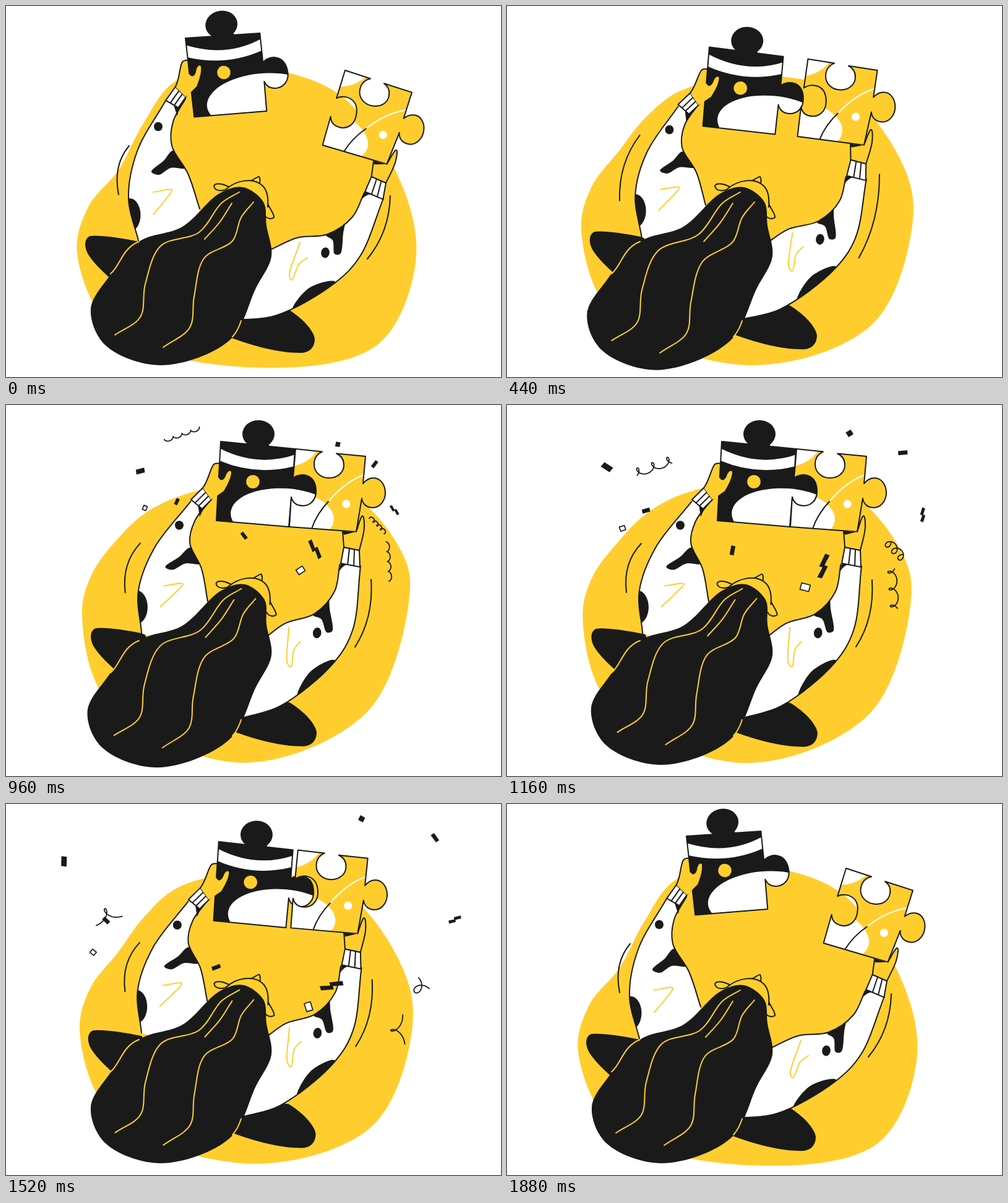
Animation of 800x600 px, one loop 1920 ms. Source, as an HTML page with a canvas:

```html
<!DOCTYPE html>
<html lang="en">
<head>
<meta charset="utf-8">
<title>Puzzle</title>
<style>
html, body { margin: 0; width: 100%; height: 100%; overflow: hidden; background: #fff; }
canvas { display: block; width: 800px; height: 600px; }
</style>
</head>
<body>
<canvas id="stage" width="800" height="600"></canvas>
<script>
const ctx = document.getElementById('stage').getContext('2d');
const YELLOW = '#ffce2e', BLACK = '#1a1a1a', WHITE = '#fff';
const LOOP = 1920, STEP = 40;
const { PI, sin, cos, sqrt, hypot, min, max } = Math;
const clamp = v => max(0, min(1, v));
const mix = (a, b, p) => a.map((v, i) => v + (b[i] - v) * p);
const add = (a, b, k = 1) => a.map((v, i) => v + b[i] * k);
const ease = (t, from, to) => {
  const u = clamp((t - from) / (to - from));
  return u * u * (3 - 2 * u);
};

// Applies f(x, y) to every point of a flat x,y list.
function warp(pts, f) {
  const out = [];
  for (let i = 0; i < pts.length; i += 2) out.push(...f(pts[i], pts[i + 1]));
  return out;
}

// Bezier handle at b towards c for a centripetal spline coming from a.
function handle(a, b, c) {
  const d1 = sqrt(hypot(b[0] - a[0], b[1] - a[1])), d2 = sqrt(hypot(c[0] - b[0], c[1] - b[1]));
  if (!d1 || !d2) return mix(b, c, 1 / 3);
  return b.map((v, i) => v + d2 / 3 * ((v - a[i]) / d1 * d2 + (c[i] - v) / d2 * d1) / (d1 + d2));
}

function curve(pts, closed, path = new Path2D(), join = false) {
  const n = pts.length / 2;
  const at = i => {
    i = closed ? (i + n) % n : max(0, min(n - 1, i));
    return [pts[2 * i], pts[2 * i + 1]];
  };
  path[join ? 'lineTo' : 'moveTo'](...at(0));
  for (let i = 0; i < (closed ? n : n - 1); i++) {
    const b = at(i), c = at(i + 1);
    path.bezierCurveTo(...handle(at(i - 1), b, c), ...handle(at(i + 2), c, b), ...c);
  }
  if (closed) path.closePath();
  return path;
}

const shape = p => typeof p === 'string' ? new Path2D(p) : p;
function fill(p, color = BLACK) { ctx.fillStyle = color; ctx.fill(shape(p)); }
function line(p, color = BLACK, width = 2) {
  ctx.strokeStyle = color;
  ctx.lineWidth = width;
  ctx.stroke(shape(p));
}
function oval(x, y, rx, ry, color = BLACK, turn = 0) {
  ctx.beginPath();
  ctx.ellipse(x, y, rx, ry, turn, 0, 2 * PI);
  ctx.fillStyle = color;
  ctx.fill();
}
function within(move, draw) {
  ctx.save();
  move();
  draw();
  ctx.restore();
}
const shifted = (x, y, draw) => within(() => ctx.translate(x, y), draw);
const clipped = (path, draw) => within(() => ctx.clip(path), draw);

// Grips are [corner x, corner y, turn in degrees]; bend shears the arm from open to joined.
const LEFT = {
  open: [290, 52, -9.5], joined: [347, 59, 0], dip: [0, 11, 5.3],
  recoil: [-4, -4, -.9], rest: 400, start: 260, wrist: [316, 152],
  bend: (x, y) => [41 - .16 * (y - 153), -.06 * (y - 153)],
  follow: (x, y) => clamp((360 - y) / 210) ** 1.5
};
const RIGHT = {
  open: [548, 104, 12.2], joined: [468, 71, 0], dip: [-3, 8, 0],
  recoil: [7, 3, .8], rest: 240, start: 200, wrist: [557, 260],
  bend: (x, y) => [min(8, -37 + .27 * (y - 311)), -.2 * (x - 365)],
  follow: (x, y) => clamp((450 - y) / 150) ** 2
};

const joining = (side, t) => ease(t, side.start, 560) - ease(t, 1460, 1880);

function grip(side, t) {
  const p = joining(side, t), kick = t < side.rest ? sin(PI * t / side.rest) : 0;
  return add(add(mix(side.open, side.joined, p), side.dip, 4 * p * (1 - p)), side.recoil, kick);
}

function place(side, [x, y, deg], [px, py]) {
  const a = deg * PI / 180, dx = px - side.joined[0], dy = py - side.joined[1];
  return [x + dx * cos(a) - dy * sin(a), y + dx * sin(a) + dy * cos(a)];
}

// Bends the open arm, and lets points near the wrist follow the hand.
function poser(side, t) {
  const p = joining(side, t);
  const bent = (x, y) => add([x, y], side.bend(x, y), p);
  const off = add(place(side, grip(side, t), side.wrist),
    bent(...place(side, side.open, side.wrist)), -1);
  return pts => warp(pts, (x, y) => add(bent(x, y), off, side.follow(x, y)));
}

function held(side, t, draw) {
  const [x, y, deg] = grip(side, t);
  within(() => {
    ctx.translate(x, y);
    ctx.rotate(deg * PI / 180);
    ctx.translate(-side.joined[0], -side.joined[1]);
  }, draw);
}

function arm(outer, inner, hidden, marks) {
  const body = curve(outer);
  body.lineTo(...hidden);
  curve(inner, false, body, true);
  body.closePath();
  fill(body, WHITE);
  clipped(body, marks);
  line(curve(outer));
  line(curve(inner));
}

function leftArm(t) {
  const at = poser(LEFT, t);
  arm(at([258,153, 212,235, 198,310, 215,383]),
    at([313,328, 294,271, 268,226, 270,187, 290,150]), [300, 400], () => {
      fill(curve(at([235,268, 255,250, 270,234, 290,262, 266,262, 247,273]), true));
      oval(...at([200, 338]), 17.5, 27);
      oval(...at([246, 195]), 7, 7.3);
      line(curve(at([238,301, 268,297.5, 258,313, 238,337])), YELLOW);
    });
}

function rightArm(t) {
  const at = poser(RIGHT, t);
  arm(at([610,311, 572,405, 530,449, 435,501, 372,508]),
    at([428,394, 470,375, 520,369, 560,341, 579,302]), [340, 470], () => {
      fill(curve(at([548,343, 517,370, 528,379, 531,401, 540,401, 545,368]), true));
      fill(curve(at([463,492, 490,456, 532,446, 515,480]), true));
      oval(...at([516, 399]), 6.8, 8.6, BLACK, .15);
      line(curve(at([475,382, 458,436, 462,443, 474,417, 487,407])), YELLOW);
    });
}

function cuff(a, b, c, d) {
  const p = new Path2D();
  [a, b, c, d].forEach(v => p.lineTo(...v));
  p.closePath();
  fill(p, WHITE);
  for (const u of [.36, .68]) {
    p.moveTo(...mix(a, b, u));
    p.lineTo(...mix(d, c, u));
  }
  line(p);
}

const leftPiece = new Path2D('M347 59 L467 71 L464 118 C475 109 500 110 501 138 ' +
  'C502 155 490 163 480 163 C468 163 463 157 461 149 L457 197 L340 187 Z');
const rightPiece = new Path2D('M468 71 L511 75.5 C501 80 498 88 498 96 C498 110 510 118 522 118 ' +
  'C536 118 546 109 546 97 C546 88 542 82 534 78.5 L581 83 L577 127 C582 121 588 118 594 118 ' +
  'C605 118 613 129 613 142 C613 155 604 166 593 166 C583 166 576 160 575 151 L566 205 L458 197 ' +
  'L461 149 C463 157 468 163 480 163 C490 163 502 155 501 138 C500 110 475 109 464 118 Z');

function leftHeld() {
  fill('M310 160 L331 153 Q319 166 313 181 Z');
  cuff([318,134], [332,153], [317,168], [299,153]);
  const finger = 'M318 134 C327 122 329 106 335 97 Q338 93 347 95 L350 130 L332 153';
  fill(finger, YELLOW);
  line(finger);
  fill(leftPiece);
  clipped(leftPiece, () => {
    fill('M347 71 Q408 101 468 80 L466 99 Q405 115 345 90 Z', WHITE);
    oval(452, 180, 89, 45, WHITE, .07);
  });
  oval(399, 124, 10.8, 10.8, YELLOW);
  line(leftPiece);
  oval(408, 47, 26, 22.5);
  fill('M395 60 L424 60 L426 69 L392 66 Z');
  fill('M319 135 C328 124 338 113 344 118 C347 124 352 122 355 115 ' +
    'C357 108 362 104 364 108 C364 119 356 132 352 139 L332 153 Z', YELLOW);
}

function rightHeld() {
  fill('M541 256 L558 257 Q545 257 538 270 Z');
  fill(rightPiece, YELLOW);
  clipped(rightPiece, () => {
    fill('M464 68 L506 70 Q490 94 464 99 Z', WHITE);
    oval(446, 180, 84, 44, WHITE, .07);
    line('M494 200 Q502 176 522 155');
    line('M522 155 Q547 125 578 113', WHITE);
  });
  oval(550, 160, 6.6, 6.6, WHITE);
  line(rightPiece);
  cuff([546,230], [571,235], [572,262], [541,256]);
  const hand = 'M544 204 L546 230 L571 235 C574 222 579 208 579 196 C579 184 578 178 575 180 C571 187 570 194 566 205';
  fill(hand, YELLOW);
  fill('M544 204 L566 205 L546 210 Z');
  line(hand);
}

function blob(q) {
  fill(curve(mix(
    [115,400, 133,325, 182,265, 222,190, 275,121, 400,100,
     540,144, 640,290, 662,415, 600,548, 415,585, 180,530],
    [123,340, 138,275, 180,217, 225,175, 285,146, 420,120,
     560,146, 643,245, 652,310, 585,495, 380,578.5, 165,480], q), true), YELLOW);
}

function legs(q) {
  shifted(9 * q, -11 * q, () =>
    fill('M215 381 C180 374 150 370 136 372 C126 376 126 390 133 402 Q143 418 168 440 L240 440 Z'));
  shifted(3 * q, -9 * q, () =>
    fill('M455 490 C480 505 497 525 499 538 C499 553 490 561 475 561 C440 561 400 550 362 536 L380 480 Z'));
}

// Speed lines follow the arms and stretch while the pieces meet.
function dash(open, joined, stretch, bow, p, burst) {
  const [x, y, X, Y] = add(mix(open, joined, p), stretch, burst);
  line(`M${x} ${y} Q${(x + X) / 2 + bow[0]} ${(y + Y) / 2 + bow[1]} ${X} ${Y}`);
}

function dashes(t) {
  const burst = sin(PI * clamp((t - 200) / 800)) ** 2;
  dash([199,226,182,305], [217,224,193,303], [6,-24,-11,17], [-18,-8], joining(LEFT, t), burst);
  dash([621,307,584,409], [590,283,564,391], [6,-26,-1,18], [17,8], joining(RIGHT, t), burst);
}

function head(k) {
  shifted(3.5 * k, -2.5 * k, () => {
    for (const p of [
      'M361 293 C348 286 338 286 336 291 C337 299 350 302 361 293',
      'M392 284 C402 281 405 276 409 276 Q412 280 409 291',
      'M422 318 C428 331 434 337 433 342 C428 346 420 343 418 338',
      'M356 296 C372 282 400 276 415 291 Q425 301 423 325']) {
      fill(p, YELLOW);
      line(p);
    }
  });
}

function hair(h, k) {
  // Points swing more the further they lie from the crown.
  const sway = (pts, from, range, dx, dy) => warp(pts, (x, y) => {
    const reach = (400 - x) * .6 + (y - 300) * .75, w = h * clamp((reach - from) / range);
    return [x + dx * w, y + dy * w];
  });
  const lift = pts => warp(pts, (x, y) => add([x, y], [3, -3], k * clamp((330 - y) / 20)));
  fill(curve(lift(sway([215,381, 285,357, 345,303, 383,293, 416,317, 421,355, 429,405, 404,456,
    362,540, 250,581, 160,548, 137,490, 167,437], 170, 130, -10, 10)), true));
  line('M215 381 C187 392 185 420 169 433', YELLOW);
  line('M380 509 Q375 525 366 535', YELLOW);
  shifted(3.5 * k, -4 * k, () => {
    for (const lock of [
      [377,301, 348,319, 312,366, 250,388, 225,450, 217,503, 176,532],
      [400,317, 380,342, 366,380, 320,408, 304,470, 297,520, 254,552],
      [365,319, 345,350, 321,377]])
      line(curve(sway(lock, 60, 110, -9, 12)), YELLOW);
  });
}

const shapes = {
  bar: 'M-.42 -.5 L.5 -.46 L.44 .5 L-.5 .46 Z',
  card: 'M-.5 -.5 L.5 -.5 L.5 .5 L-.5 .5 Z',
  bolt: 'M-.5 -.4 L-.25 -.5 L0 -.06 L.18 -.14 L.5 .38 L.26 .5 L.02 .06 L-.16 .14 Z'
};
// Kind, place, drift, size, turn.
const bits = [
  ['bar', 218,107, -96,-11, 15,8, -.3],
  ['bar', 277,156, -89,25, 6,11, .4],
  ['card', 225,166, -65,57, 6,7, .4],
  ['bar', 385,211, -35,41, 6,13, -.7],
  ['bolt', 499,233, 21,47, 22,32, 0],
  ['card', 476,267, 10,47, 12,9, -.6],
  ['bar', 536,64, 30,-31, 8,8, .1],
  ['bar', 595,96, 76,-32, 6,13, .6],
  ['bolt', 627,170, 76,13, 16,16, 0]
];
// Place, drift, heading, length.
const ribbons = [
  [285,48, -91,98, 2.8, 60],
  [601,194, 50,77, .8, 34],
  [619,253, 10,84, 1.5, 64]
];

function confetti(t) {
  if (t < 640) return;
  const born = ease(t, 560, 860);
  const far = 1.4 - 2.7 * (1 - clamp((t - 600) / 1060)) ** 1.6;
  const size = born * (1 - ease(t, 1460, 1660)) * (1 + .35 * far);
  if (size > .02) for (const [kind, x, y, vx, vy, w, h, turn] of bits) {
    const p = new Path2D();
    p.addPath(new Path2D(shapes[kind]), new DOMMatrix().translate(x + vx * far, y + vy * far)
      .rotate((turn + 1.45 * far) * 180 / PI).scale(w * size, h * size));
    fill(p, kind === 'card' ? WHITE : BLACK);
    if (kind === 'card') line(p, BLACK, 1.7);
  }
  const s = (t - 960) / 360, drift = s - .09 * s * s;
  const span = (1 - .72 * ease(t, 1320, 1680)) * (1 - ease(t, 1660, 1800));
  if (span > .02) for (const r of ribbons) ribbon(r, drift, clamp(s), span, born);
}

// A wavy streamer that winds up into loops and then shortens to an arc.
function ribbon([x, y, vx, vy, heading, length], drift, coil, span, born) {
  const turns = 4 - 2.3 * coil, radius = 2.5 + 8 * coil, long = length * (1 + .3 * coil);
  shifted(x + vx * drift, y + vy * drift, () => {
    ctx.rotate(heading);
    ctx.scale(born, born);
    const p = new Path2D();
    for (let i = 0; i <= 60; i++) {
      const u = (i / 60 - .5) * span, a = 2 * PI * turns * u;
      p.lineTo(long * u - radius * sin(a), radius * cos(a));
    }
    line(p, BLACK, 1.8);
  });
}

function draw(t) {
  const q = sin(PI * clamp(t / 1880)) ** 1.15;
  const h = sin(PI * clamp(t / 1300)) ** 2;
  const k = ease(t, 640, 920) - ease(t, 1200, 1600);
  ctx.fillStyle = WHITE;
  ctx.fillRect(0, 0, 800, 600);
  blob(q);
  dashes(t);
  legs(q);
  leftArm(t);
  rightArm(t);
  confetti(t);
  held(LEFT, t, leftHeld);
  held(RIGHT, t, rightHeld);
  head(k);
  hair(h, k);
}

ctx.lineCap = ctx.lineJoin = 'round';
const begin = performance.now();
function tick() {
  const t = max(0, performance.now() - begin) % LOOP;
  draw(Math.floor(t / STEP) * STEP);
  requestAnimationFrame(tick);
}
tick();
</script>
</body>
</html>
```
